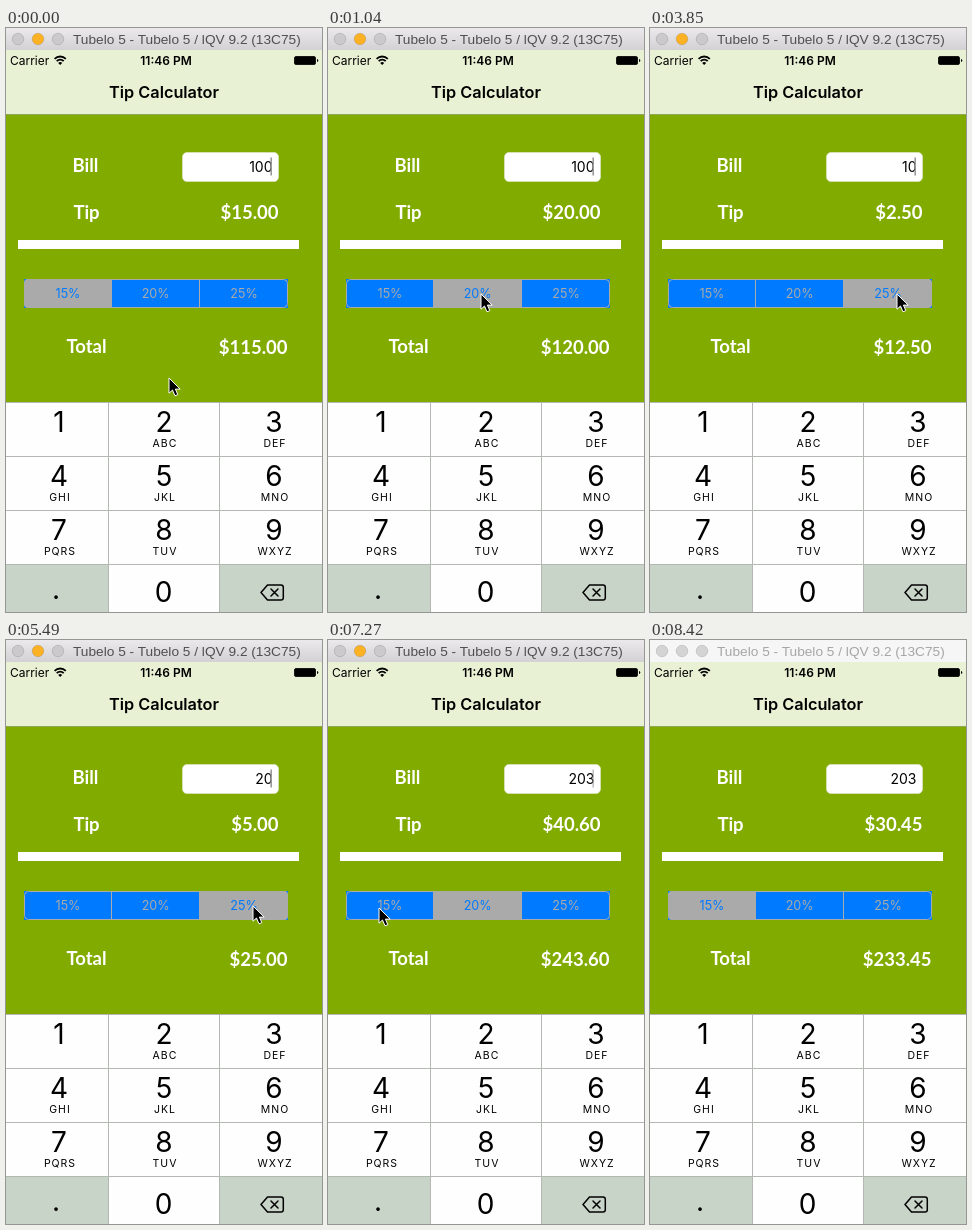
Write an HTML page that moves like this. It is 316x584 px and loops after 8.52 s.

```html
<!DOCTYPE html>
<html lang="en">
<head>
<meta charset="utf-8">
<title>Tip Calculator</title>
<style>
  html, body { margin: 0; width: 100%; height: 100%; overflow: hidden; }
  svg { display: block; width: 100vw; height: 100vh; font-family: Inter, Roboto, sans-serif; }
  .mid { text-anchor: middle; }
  .end { text-anchor: end; }
  .label { font: 700 18.5px Lato, sans-serif; fill: #fff; }
  .digit { font-size: 28px; }
  .letters { font-size: 10.5px; letter-spacing: 1px; }
</style>
</head>
<body>
<svg viewBox="0 0 316 584">
  <defs>
    <linearGradient id="chrome" x2="0" y2="1">
      <stop stop-color="#ebe9eb"/><stop offset="1" stop-color="#d3d1d3"/>
    </linearGradient>
  </defs>

  <rect width="316" height="584" fill="#82ab00"/>

  <!-- Window title bar -->
  <rect id="titleBar" width="316" height="22"/>
  <g id="buttons" stroke-opacity=".12" stroke="#000">
    <circle cx="12" cy="11" r="5.8"/><circle cx="32" cy="11" r="5.8"/><circle cx="52" cy="11" r="5.8"/>
  </g>
  <text id="title" x="67" y="16" font-family="Liberation Sans, Arial, sans-serif" font-size="13.7">Tubelo 5 - Tubelo 5 / lQV 9.2 (13C75)</text>

  <!-- Status and navigation bar -->
  <rect y="22" width="316" height="64" fill="#e8f1d3"/>
  <path d="M0 86.5H316" stroke="#8fa758"/>
  <text x="4" y="37" font-size="12">Carrier</text>
  <g fill="none" stroke="#000" stroke-width="1.8">
    <path d="M48.6 30.8a8 8 0 0 1 11.2 0M50.7 33.2a5 5 0 0 1 7 0"/>
    <path d="M54.2 37l-2-2.1a2.9 2.9 0 0 1 4 0z" fill="#000" stroke="none"/>
  </g>
  <text class="mid" x="160" y="37" font-size="12" font-weight="600">11:46 PM</text>
  <rect x="288.5" y="28.5" width="21" height="8" rx="1.5" stroke="#000" stroke-width=".8"/>
  <path d="M311 31v3q1.3-.3 1.3-1.5T311 31z"/>
  <text class="mid" x="158" y="70" font-size="16.3" font-weight="600">Tip Calculator</text>

  <!-- Calculator -->
  <g class="label">
    <text class="mid" x="79.5" y="144">Bill</text>
    <text class="mid" x="80.5" y="191">Tip</text>
    <text class="mid" x="80.5" y="325">Total</text>
    <text class="end" id="tip" x="272.5" y="191"></text>
    <text class="end" id="total" x="281.5" y="326"></text>
  </g>
  <rect x="176.5" y="124.5" width="96" height="29" rx="4.5" fill="#fff" stroke="#dfe6c8" stroke-width=".7"/>
  <text class="end" id="bill" x="266.5" y="144" font-size="14"></text>
  <rect id="caret" x="264.4" y="129.5" width="1.6" height="18" fill="#999"/>
  <rect x="12" y="212" width="281" height="9" fill="#fff"/>
  <rect x="18" y="251" width="264" height="29" fill="#007aff"/>
  <g id="segments"></g>
  <rect x="18.5" y="251.5" width="263" height="28" rx="4" fill="none" stroke="#aaa"/>
  <path d="M105.5 252v27M193.5 252v27" stroke="#aaa"/>

  <!-- Keypad -->
  <rect y="374" width="316" height="210" fill="#fefefe"/>
  <path d="M0 537H102.5V584H0zM213.5 537H316V584H213.5z" fill="#c9d4c8"/>
  <path d="M0 374.5H316M0 428.5H316M0 482.5H316M0 536.5H316M102.5 374V584M213.5 374V584" stroke="#b4b8b2" fill="none"/>
  <g id="keys"></g>
  <g fill="none" stroke="#000" stroke-width="1.5" stroke-linejoin="round" stroke-linecap="round">
    <path d="M255 564.5l6.5-7.5H275q2.3 0 2.3 2.3v10.4q0 2.3-2.3 2.3H261.5z"/>
    <path d="M265 561l7 7M272 561l-7 7"/>
  </g>

  <path id="cursor" d="M0 0V15.2l3.5-3.2 2.5 5.8 2.8-1.2-2.4-5.5h4.8z" stroke="#fff"/>
</svg>

<script>
const LOOP = 8520, STEP = 148.3, BLUE = [0, 122, 255], GREY = [170, 170, 170];
const $ = id => document.getElementById(id);

// Each list holds [step, value...] entries.
const bills = [[0, '100'], [26, '10'], [27, '1'], [28, ''], [36, '2'], [37, '20'], [39, '203']];
const choices = [[0, 0], [6, 1], [11, 2], [45, 1], [50, 0]];
const rates = [15, 20, 25];
const cursorPath = [
  [1, 163, 350], [5, 153, 266], [8, 153, 266], [11, 247, 266], [41, 247, 266],
  [44, 161, 273], [46, 161, 273], [49, 51, 268], [50, 58, 267], [51, 58, 267], [56, 306, 590]
];
const blink = [.6, 0, 0, .2, 1, 1, 1];

const text = (cls, x, y, s) => `<text class="${cls}" x="${x}" y="${y}">${s}</text>`;

$('keys').innerHTML = ['', 'ABC', 'DEF', 'GHI', 'JKL', 'MNO', 'PQRS', 'TUV', 'WXYZ'].map((letters, i) => {
  const x = [53, 158, 268][i % 3], y = 404 + 54 * Math.floor(i / 3);
  return text('mid digit', x, y, i + 1) + text('mid letters', x + 1, y + 15, letters);
}).join('') + text('mid digit', 157.5, 574, 0) + text('mid digit', 50, 571, '.');

const segmentShapes = [
  'M106 251H22q-4 0-4 4v21q0 4 4 4h84z',
  'M105 251h89v29h-89z',
  'M193 251h85q4 0 4 4v21q0 4-4 4h-85z'
];
$('segments').innerHTML = rates.map((rate, i) =>
  `<g font-size="12.6"><path d="${segmentShapes[i]}"/>${text('mid', [62, 149.7, 238][i], 270, rate + '%')}</g>`).join('');

const latest = (list, k) => list.filter(entry => entry[0] <= k).pop();
const mix = (a, b, p) => `rgb(${a.map((v, i) => Math.round(v + (b[i] - v) * p))})`;
const money = cents => '$' + (cents / 100).toFixed(2);

function cursorAt(k) {
  const next = cursorPath.findIndex(point => point[0] > k);
  if (next === 0) return cursorPath[0].slice(1);
  if (next < 0) return cursorPath[cursorPath.length - 1].slice(1);
  const [k0, x0, y0] = cursorPath[next - 1], [k1, x1, y1] = cursorPath[next];
  const p = (k - k0) / (k1 - k0), e = p * p * (3 - 2 * p);
  return [x0 + (x1 - x0) * e, y0 + (y1 - y0) * e];
}

function caretAt(k) {
  // Typing keeps the caret lit, then blinking restarts.
  const start = k < 26 ? 1 : k < 36 ? 32 : 42;
  return k < start ? 1 : blink[(k - start) % blink.length];
}

function draw(t) {
  const active = t < 8420;
  const k = active ? Math.floor((t + 13) / STEP) : 57;

  $('titleBar').setAttribute('fill', active ? 'url(#chrome)' : '#f6f6f6');
  $('title').setAttribute('fill', active ? '#505050' : '#a6a6a6');
  [...$('buttons').children].forEach((button, i) =>
    button.setAttribute('fill', !active ? '#d4d4d4' : i === 1 ? '#fdb225' : '#cbc9cb'));

  const bill = latest(bills, k)[1];
  const [since, choice] = latest(choices, k);
  const amount = bill * 100, tip = Math.round(amount * rates[choice] / 100);
  $('bill').textContent = bill;
  $('tip').textContent = money(tip);
  $('total').textContent = money(amount + tip);
  $('caret').setAttribute('opacity', caretAt(k));

  const previous = since ? latest(choices, since - 1)[1] : choice;
  const fade = since && k === since ? .2 : 1;
  [...$('segments').children].forEach((segment, i) => {
    const selected = i === choice ? fade : i === previous ? 1 - fade : 0;
    segment.children[0].setAttribute('fill', mix(BLUE, GREY, selected));
    segment.children[1].setAttribute('fill', mix(GREY, BLUE, selected));
  });

  $('cursor').setAttribute('transform', `translate(${cursorAt(k)})`);
  $('cursor').setAttribute('visibility', k < 56 ? 'visible' : 'hidden');
}

const begin = performance.now();
function tick() {
  draw((performance.now() - begin) % LOOP);
  requestAnimationFrame(tick);
}
tick();
</script>
</body>
</html>
```
